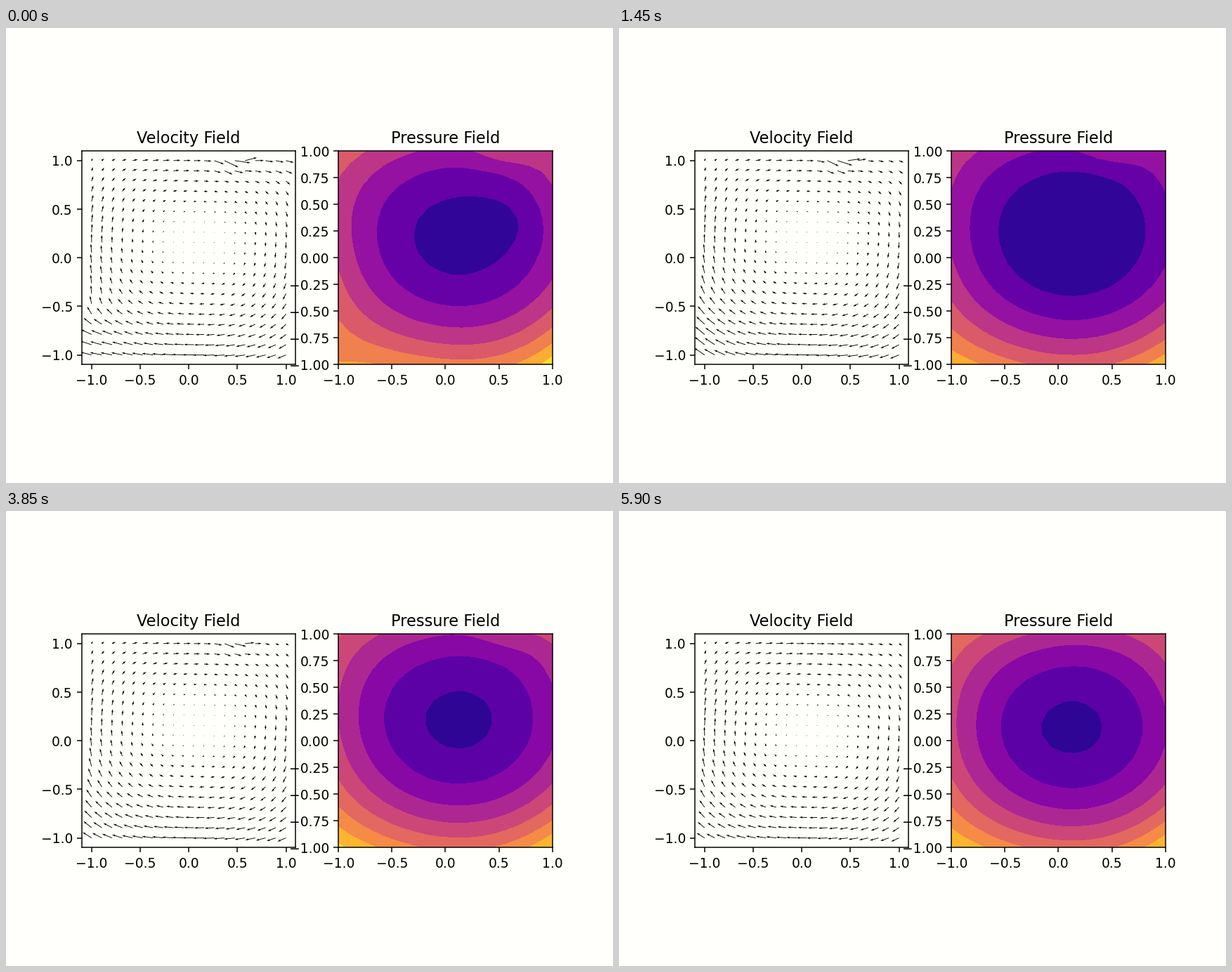
Animation of 864x648 px, one loop 5950 ms. Source, as a matplotlib script:

```python
import numpy as np
import matplotlib.pyplot as plt
from matplotlib.animation import FuncAnimation

FRAMES, STEP = 119, 50
PAPER = "#fffffb"
UNIT = 138.35  # pixels per data unit in the velocity panel
KEYS = (0, 0.85, 1.45, 2.35, 5.9)  # seconds

axis = np.linspace(-1, 1, 20)
X, Y = np.meshgrid(axis, axis)
TOP, LOW = np.maximum(Y, 0), Y < 0


def track(t, *values):
    return np.interp(t, KEYS, values)


def bump(cx, cy, wx, wy):
    return np.exp(-((X - cx) / wx) ** 2 - ((Y - cy) / wy) ** 2)


def corner(sx, sy):
    """Weight that grows from the axes to 1 in one corner."""
    return X ** 2 * Y ** 2 * (1 + sx * X) * (1 + sy * Y) / 4


def jet_state(t):
    """Place and strength of the disturbance near the lid."""
    return track(t, 0.45, 0.42, 0.39, 0.39, 0.6), 1 - (t / 5.9) ** 2


def centre_y(t):
    return np.interp(t, (0, 2.35, 5.9), (0.2, 0.247, 0.125))


def pressure(t):
    """Elliptic bowl with uneven corners, scaled to 0..1."""
    jet, power = jet_state(t)
    gain = track(t, 1.08, 0.92, 1.02, 0.95, 1.08)
    p = track(t, 0.07, -0.012, -0.012, 0.08, 0.085)
    p = p + gain * (0.285 * (X - 0.125) ** 2 + 0.385 * (Y - centre_y(t)) ** 2)
    p += track(t, -0.3, 0.07, -0.1, -0.07, -0.1) * corner(-1, -1)
    p += 0.05 * corner(1, -1) - 0.08 * corner(1, 1) - 0.13 * corner(-1, 1)
    p += 0.1 * power * bump(jet + 0.1, 1, 0.3, 0.15)
    p -= 0.05 * np.exp(-t / 0.6) * bump(0.6, 0.35, 0.3, 0.3)
    return np.clip(p, 0.002, 0.998)


def velocity(t):
    """Clockwise vortex, lid jet and a surge in the lower left, in pixels."""
    cy = centre_y(t) - 0.03
    jet, power = jet_state(t)
    dx, dy = X - 0.1, Y - cy
    u = 13 * dy * (0.8 + 0.2 * dy ** 2)
    u *= np.where(LOW, 1 - 0.25 * X ** 2, 1 - TOP * X ** 2 * (0.72 - 0.13 * X))
    v = -11 * dx * (0.75 + 0.25 * dx ** 2) * (1 - np.where(LOW, 0.45, 0.72) * Y ** 2)

    core = 1 - track(t, 0.5, 0.5, 0.45, 0.4, 0.2) * bump(0.1, cy, 0.5, 0.3)
    u, v = u * core, v * core

    u += 13 * power * bump(jet, 1, 0.17, 0.1)
    v += 9 * power * (0.7 * bump(jet + 0.12, 1, 0.1, 0.09)
                      - bump(jet - 0.08, 1, 0.13, 0.12))
    u += max(0, 7 - 3 * t) * bump(1, 1, 0.35, 0.2)

    u -= 8 * np.exp(-t / 2) * bump(-1, -0.75, 0.3, 0.32)
    u += 7 * np.exp(-t / 0.25) * bump(-1, -0.5, 0.25, 0.25)
    v += track(t, -3, 6, 3, 2, 0) * bump(-1, -0.95, 0.3, 0.25)
    return u, v


def band_count(t):
    """The colour scale coarsens during the surge, then refines."""
    return 7 if 0.4 < t < 1.15 else 8 if t < 1.9 else 9


fig, (left, right) = plt.subplots(1, 2, figsize=(6.4, 4.8), dpi=135, facecolor=PAPER)
for ax, lim, rows, name in ((left, 1.1, 5, "Velocity Field"),
                            (right, 1, 9, "Pressure Field")):
    ax.set(xlim=(-lim, lim), ylim=(-lim, lim), aspect="equal", title=name,
           facecolor=PAPER, xticks=np.linspace(-1, 1, 5),
           yticks=np.linspace(-1, 1, rows))
    ax.set_autoscale_on(False)

arrows = left.quiver(X, Y, *velocity(0), angles="uv", scale_units="xy", scale=UNIT)
shown = []


def draw(i):
    t = i * STEP / 1000
    arrows.set_UVC(*velocity(t))
    while shown:
        shown.pop().remove()
    levels = np.linspace(0, 1, band_count(t) + 1)
    shown.append(right.contourf(X, Y, pressure(t), levels,
                                cmap="plasma", vmin=0, vmax=1))
    return [arrows, shown[0]]


anim = FuncAnimation(fig, draw, frames=FRAMES, interval=STEP, repeat=True,
                     repeat_delay=0, blit=False)
plt.show()
```
